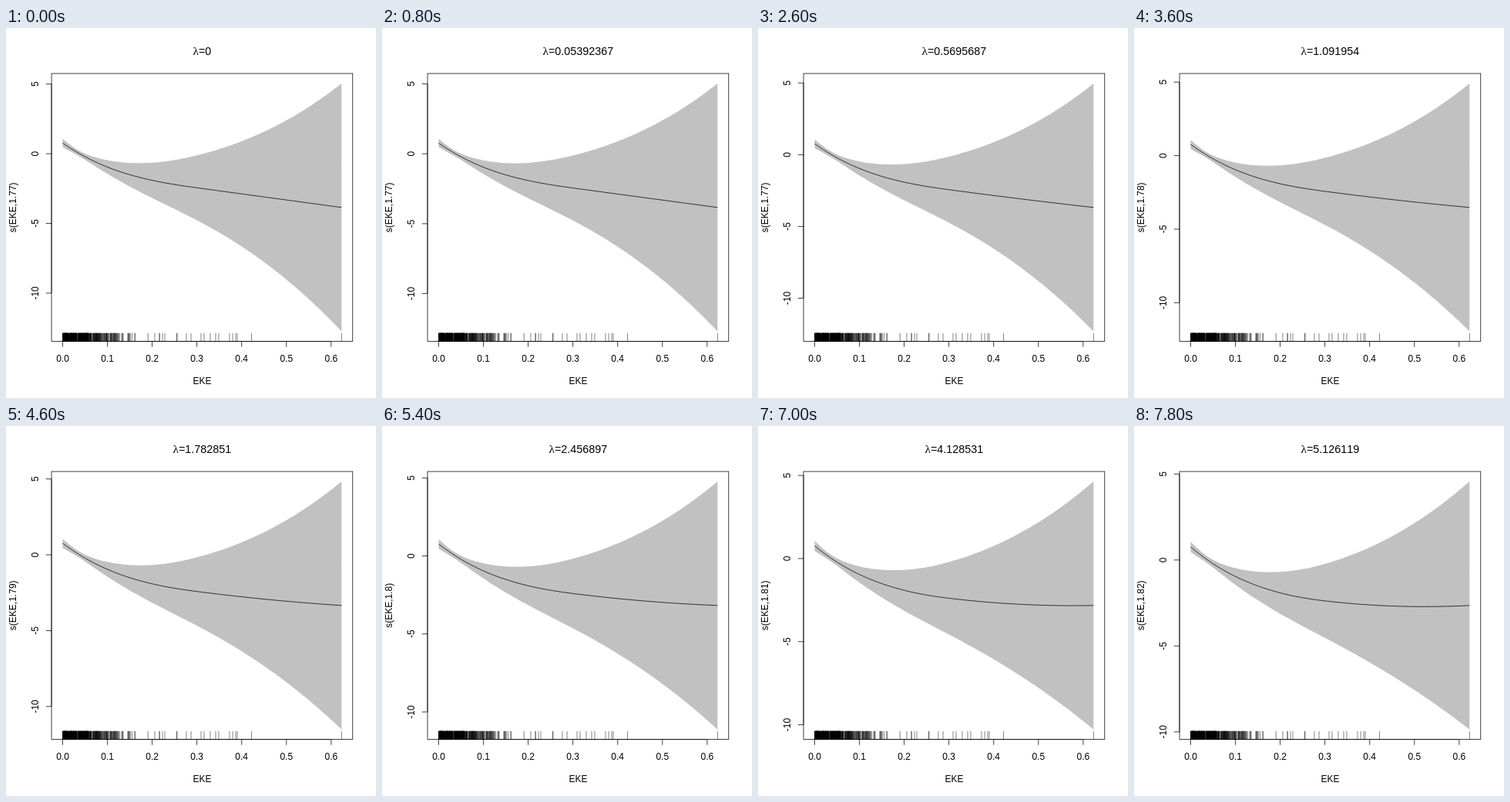
An HTML page for the animation above (8 s loop, 480 by 480 pixels).

```html
<!DOCTYPE html>
<html lang="en">
<head>
<meta charset="utf-8">
<title>Smooth term by λ</title>
<style>
  html, body { margin: 0; width: 100%; height: 100%; overflow: hidden; background: #fff; }
  svg { display: block; width: 100vw; height: 100vh; }
  text { font: 12px "Liberation Sans", Arial, sans-serif; font-kerning: none; text-anchor: middle; }
  .title { font-size: 14.4px; }
  .lambda { font-family: "Liberation Serif", serif; font-size: 15.5px; }
  .line { fill: none; stroke: #000; stroke-width: .75; }
  #rug { stroke-width: .5; }
</style>
</head>
<body>
<svg viewBox="0 0 480 480">
  <rect width="480" height="480" fill="#fff"/>
  <path id="band" fill="#c1c1c1"/>
  <path id="fit" class="line"/>
  <path id="rug" class="line"/>
  <rect class="line" x="59.04" y="59.04" width="390.72" height="347.52"/>
  <g id="xAxis"></g>
  <g id="yAxis"></g>
  <text class="title" x="254.4" y="35"><tspan class="lambda">λ</tspan><tspan id="value"></tspan></text>
  <text x="254.4" y="462">EKE</text>
  <text id="yLabel" transform="translate(13 232.8) rotate(-90)"></text>
</svg>
<script>
const $ = id => document.getElementById(id);
const STEP = 200, STEPS = 40;
const LEFT = 59.04, BOTTOM = 406.56, DATA_TOP = 71.91, DATA_HEIGHT = 321.78;
const X0 = 73.51, X_SCALE = 580.5, X_MAX = 0.6232;
const LAMBDA_UNIT = 0.0033702292;

const px = x => X0 + x * X_SCALE;
const hinge = (v, power) => Math.max(0, v) ** power;
const toPath = points => points.map(p => p.map(n => n.toFixed(2)).join(" ")).join("L");

// s runs from 0 (no penalty) to 1 (last step)
const mean = (x, s) =>
  -1.14 - 4.358 * x + 1.9 * hinge(1 - x / 0.32, 3) + 6.763 * s * hinge(x - 0.2, 2);
const halfWidth = (x, s) =>
  Math.hypot(0.2, (x - 0.035) * (6.6 + x * x * (25.67 - 7.36 * s - 6 * x)));

function drawXAxis() {
  let html = `<path class="line" d="M${X0} ${BOTTOM}H${px(0.6)}"/>`;
  for (let i = 0; i <= 6; i++) {
    const x = px(i / 10);
    html += `<path class="line" d="M${x} ${BOTTOM}v7.2"/><text x="${x}" y="433">${(i / 10).toFixed(1)}</text>`;
  }
  $("xAxis").innerHTML = html;
}

// Half-normal crowd near zero plus a few outlying marks
function drawRug() {
  let seed = 7;
  const random = () => (seed = (seed * 16807) % 2147483647) / 2147483647;
  const marks = [193, 199, 203, 206, 222, 234, 240, 253, 257, 265, 272, 276, 290, 294, 298, 300, 318.5, 435.3];
  for (let i = 0; i < 400; i++) {
    const normal = Math.sqrt(-2 * Math.log(random())) * Math.cos(2 * Math.PI * random());
    marks.push(X0 + 38 * Math.abs(normal));
  }
  // Separate paths let overlapping marks darken
  $("rug").outerHTML = marks.map(x =>
    `<path class="line" style="stroke-width:.5" d="M${x.toFixed(2)} 395.8V${BOTTOM}"/>`).join("");
}

function draw(step) {
  const t = (step / (STEPS - 1)) ** 2;
  const s = 3.5 * t / (t + 2.5);
  const endWidth = halfWidth(X_MAX, s);
  const yMax = mean(X_MAX, s) + endWidth;
  const py = y => DATA_TOP + (yMax - y) * DATA_HEIGHT / (2 * endWidth);

  const upper = [], lower = [], middle = [];
  for (let i = 0; i <= 100; i++) {
    const x = X_MAX * i / 100, m = mean(x, s), w = halfWidth(x, s);
    upper.push([px(x), py(m + w)]);
    middle.push([px(x), py(m)]);
    lower.unshift([px(x), py(m - w)]);
  }
  $("band").setAttribute("d", `M${toPath([...upper, ...lower])}Z`);
  $("fit").setAttribute("d", `M${toPath(middle)}`);

  $("yAxis").innerHTML = `<path class="line" d="M${LEFT} ${py(5)}V${py(-10)}"/>` +
    [5, 0, -5, -10].map(v =>
      `<path class="line" d="M${LEFT} ${py(v)}h-7.2"/>` +
      `<text transform="translate(42 ${py(v)}) rotate(-90)">${v}</text>`).join("");

  const lambda = LAMBDA_UNIT * step * step, edf = 1.7655 + 0.0565 * s;
  $("value").textContent = "=" + Number(lambda.toPrecision(7));
  $("yLabel").textContent = `s(EKE,${Number(edf.toFixed(2))})`;
}

let shown = 0;
const start = performance.now();
function tick(now) {
  const step = Math.floor(Math.max(0, now - start) / STEP) % STEPS;
  if (step !== shown) draw(shown = step);
  requestAnimationFrame(tick);
}

drawXAxis();
drawRug();
draw(0);
requestAnimationFrame(tick);
</script>
</body>
</html>
```
